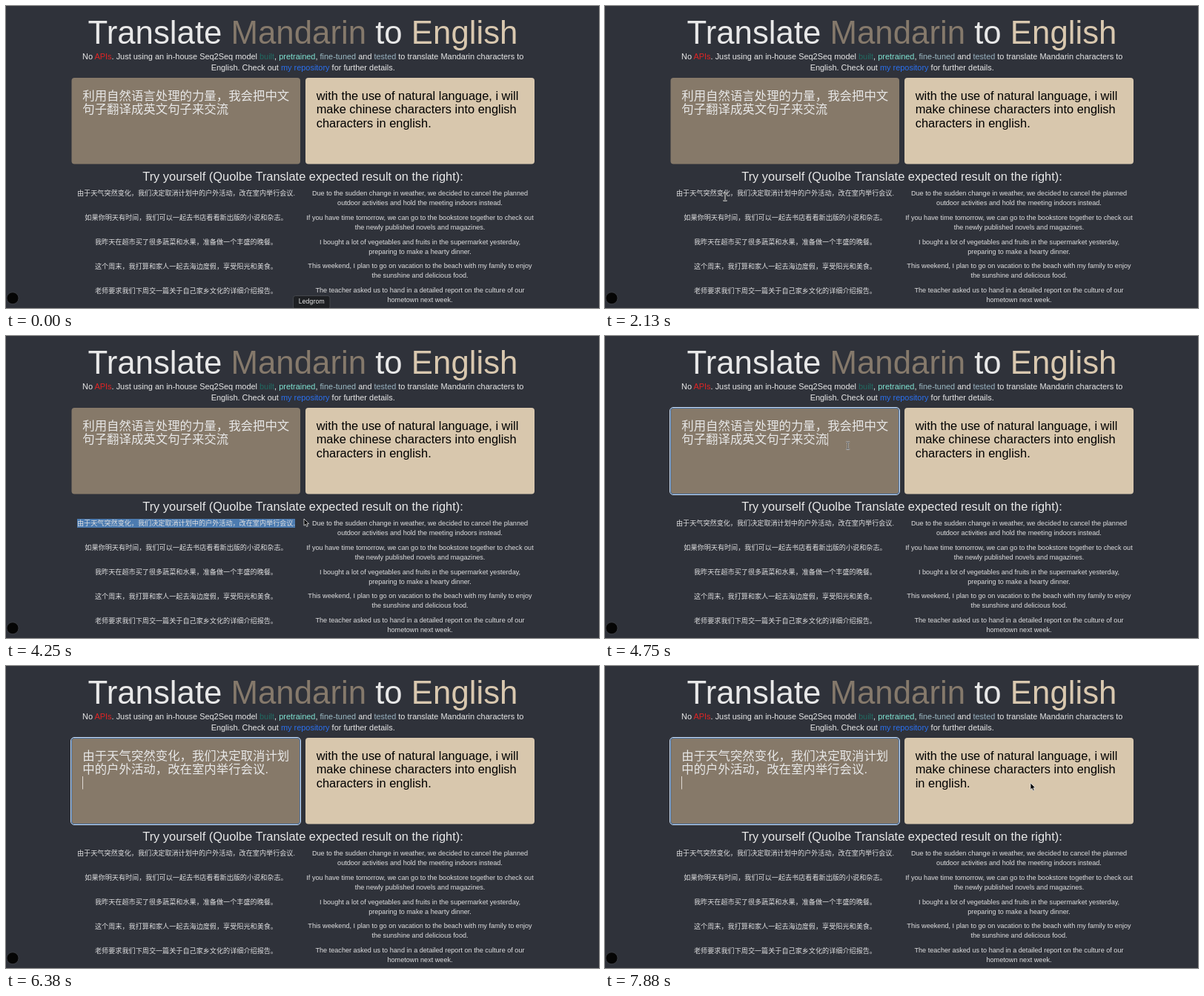
Animation of 800 by 408 pixels, one loop 8000 ms. Source, as an HTML page:

```html
<!DOCTYPE html>
<html lang="zh-CN">
<head>
<meta charset="utf-8">
<title>Translate Mandarin to English</title>
<style>
  html, body { margin: 0; width: 100%; height: 100%; overflow: hidden; background: #2f323a; font-size: 9.12px; }
  svg { display: block; width: 800px; height: 408px; }
  text { font-family: "Liberation Sans", Arial, "Noto Sans CJK SC", "Noto Sans CJK", sans-serif; fill: #e8e8e8; }
  .mid { text-anchor: middle; }
  .title { font-size: 4.8rem; }
  .intro { font-size: 1.2rem; }
  .large { font-size: 1.8rem; }
  .row { font-size: 1rem; fill: #dfdfe0; }
  .tip { font: 8.3px Inter, sans-serif; }
  .output { fill: #000; }
</style>
</head>
<body>
<svg viewBox="0 0 800 408">
  <text class="mid title" x="400.5" y="51">Translate <tspan fill="#85796b">Mandarin</tspan> to <tspan fill="#d9c8af">English</tspan></text>
  <text class="mid intro" x="400.7" y="72">No <tspan fill="#e02424">APIs</tspan>. Just using an in-house Seq2Seq model <tspan fill="#216b62">built</tspan>, <tspan fill="#7fe3d2">pretrained</tspan>, <tspan fill="#9dbcc6">fine-tuned</tspan> and <tspan fill="#9ab4c2">tested</tspan> to translate Mandarin characters to</text>
  <text class="mid intro" x="400.7" y="86.8">English. Check out <tspan fill="#2a70f0">my repository</tspan> for further details.</text>

  <rect x="88.5" y="97" width="308.5" height="116.5" rx="4" fill="#867969"/>
  <rect x="404" y="97" width="309" height="116.5" rx="4" fill="#d8c7ad"/>
  <g id="focus" fill="none">
    <rect x="87.5" y="96.5" width="310" height="118" rx="4.5" stroke="#cfe0f5"/>
    <rect x="88.5" y="97.5" width="308" height="116" rx="3.5" stroke="#3d74b8" stroke-width=".8"/>
  </g>
  <g id="input"></g>
  <g id="output"></g>
  <path id="caret" stroke="#e8e4df" stroke-width=".9"/>

  <text class="mid large" x="400.5" y="236">Try yourself (Quolbe Translate expected result on the right):</text>
  <rect id="selection" x="96" y="247" height="12" fill="#4c7bb0"/>
  <g id="rows"></g>

  <circle cx="9" cy="394.7" r="8" fill="#050505" stroke="#43464c" stroke-width=".8"/>
  <g id="tip">
    <rect x="387.5" y="391.5" width="49.5" height="18" rx="3" fill="#1e2023" stroke="#4c4f55" stroke-width=".8"/>
    <text class="mid tip" x="412.2" y="402.4">Ledgrom</text>
  </g>
  <g id="pointer">
    <path id="arrow" d="M0 0V9.2L2.1 7.3L3.6 10.5L5.2 9.8L3.8 6.7H6.6Z" fill="#000" stroke="#e8e8e8" stroke-width=".8"/>
    <g id="beam" fill="none">
      <path d="M-2.5-5Q0-5 0-3.5Q0-5 2.5-5M0-3.5V3.5M-2.5 5Q0 5 0 3.5Q0 5 2.5 5" stroke="#e8e8e8" stroke-width="1.8"/>
      <path d="M-2.5-5Q0-5 0-3.5Q0-5 2.5-5M0-3.5V3.5M-2.5 5Q0 5 0 3.5Q0 5 2.5 5" stroke="#222" stroke-width=".8"/>
    </g>
  </g>
</svg>
<script>
const $ = id => document.getElementById(id);
const show = (id, on) => $(id).style.display = on ? '' : 'none';
const text = (cls, x, y, s) => `<text class="${cls}" x="${x}" y="${y}">${s}</text>`;

const samples = [
  ['由于天气突然变化，我们决定取消计划中的户外活动，改在室内举行会议.',
   'Due to the sudden change in weather, we decided to cancel the planned', 'outdoor activities and hold the meeting indoors instead.'],
  ['如果你明天有时间，我们可以一起去书店看看新出版的小说和杂志。',
   'If you have time tomorrow, we can go to the bookstore together to check out', 'the newly published novels and magazines.'],
  ['我昨天在超市买了很多蔬菜和水果，准备做一个丰盛的晚餐。',
   'I bought a lot of vegetables and fruits in the supermarket yesterday,', 'preparing to make a hearty dinner.'],
  ['这个周末，我打算和家人一起去海边度假，享受阳光和美食。',
   'This weekend, I plan to go on vacation to the beach with my family to enjoy', 'the sunshine and delicious food.'],
  ['老师要求我们下周交一篇关于自己家乡文化的详细介绍报告。',
   'The teacher asked us to hand in a detailed report on the culture of our', 'hometown next week.']
];
$('rows').innerHTML = samples.map(([zh, first, second], i) => {
  const y = 256 + i * 32.8;
  return text('mid row', 243, y + .3, zh) + text('mid row', 558.5, y, first) + text('mid row', 558.5, y + 13, second);
}).join('');

const oldInput = ['利用自然语言处理的力量，我会把中文', '句子翻译成英文句子来交流'];
const newInput = ['由于天气突然变化，我们决定取消计划', '中的户外活动，改在室内举行会议.'];
const oldOutput = ['with the use of natural language, i will', 'make chinese characters into english', 'characters in english.'];
const newOutput = [...oldOutput.slice(0, 2), 'in english.'];

function setLines(id, cls, x, lines) {
  if ($(id).lines === lines) return;
  $(id).lines = lines;
  $(id).innerHTML = lines.map((s, i) => text(cls, x, 127 + i * 18.4, s)).join('');
}

// Pointer path: time, x, y, shape held until the next key
const path = [
  [1500, 300, 412, 'arrow'], [1875, 190, 275, 'beam'], [2125, 162, 258, 'beam'], [2375, 162, 258, 'beam'],
  [3000, 95, 250, 'arrow'], [3375, 95, 250, 'arrow'], [3500, 110, 253, 'beam'], [4125, 402, 247, 'arrow'],
  [4250, 402, 247, 'arrow'], [4625, 330, 150, 'beam'], [5125, 315, 138, 'beam'], [5875, 315, 138, ''],
  [6875, 430, 146, 'arrow'], [7250, 574, 158, 'arrow'], [8000, 574, 158, 'arrow']
];

function pointerAt(t) {
  const i = path.findIndex(key => key[0] > t) - 1;
  if (i < 0) return { x: 0, y: 0, shape: '' };
  const [t0, x0, y0, shape] = path[i], [t1, x1, y1] = path[i + 1];
  const u = (t - t0) / (t1 - t0), k = u * u * (3 - 2 * u);
  return { x: x0 + (x1 - x0) * k, y: y0 + (y1 - y0) * k, shape };
}

function draw(now) {
  const t = Math.floor(now % 8000 / 125) * 125;
  const { x, y, shape } = pointerAt(t);
  const focused = t >= 4750, pasted = t >= 6250;

  show('tip', t < 250);
  show('arrow', shape === 'arrow');
  show('beam', shape === 'beam');
  $('pointer').setAttribute('transform', `translate(${x} ${y})`);

  const selecting = t > 3375 && !focused;
  $('selection').setAttribute('width', !selecting ? 0 : t >= 4125 ? 294 : Math.min(294, Math.max(0, x - 96)));

  show('focus', focused);
  show('caret', focused);
  $('caret').setAttribute('d', pasted ? 'M103.5 149V166.5' : 'M300.5 131V148.5');
  setLines('input', 'large', 103.3, pasted ? newInput : oldInput);
  setLines('output', 'large output', 418.7, t >= 7500 ? newOutput : oldOutput);
}

function loop() {
  draw(performance.now());
  requestAnimationFrame(loop);
}
loop();
</script>
</body>
</html>
```
